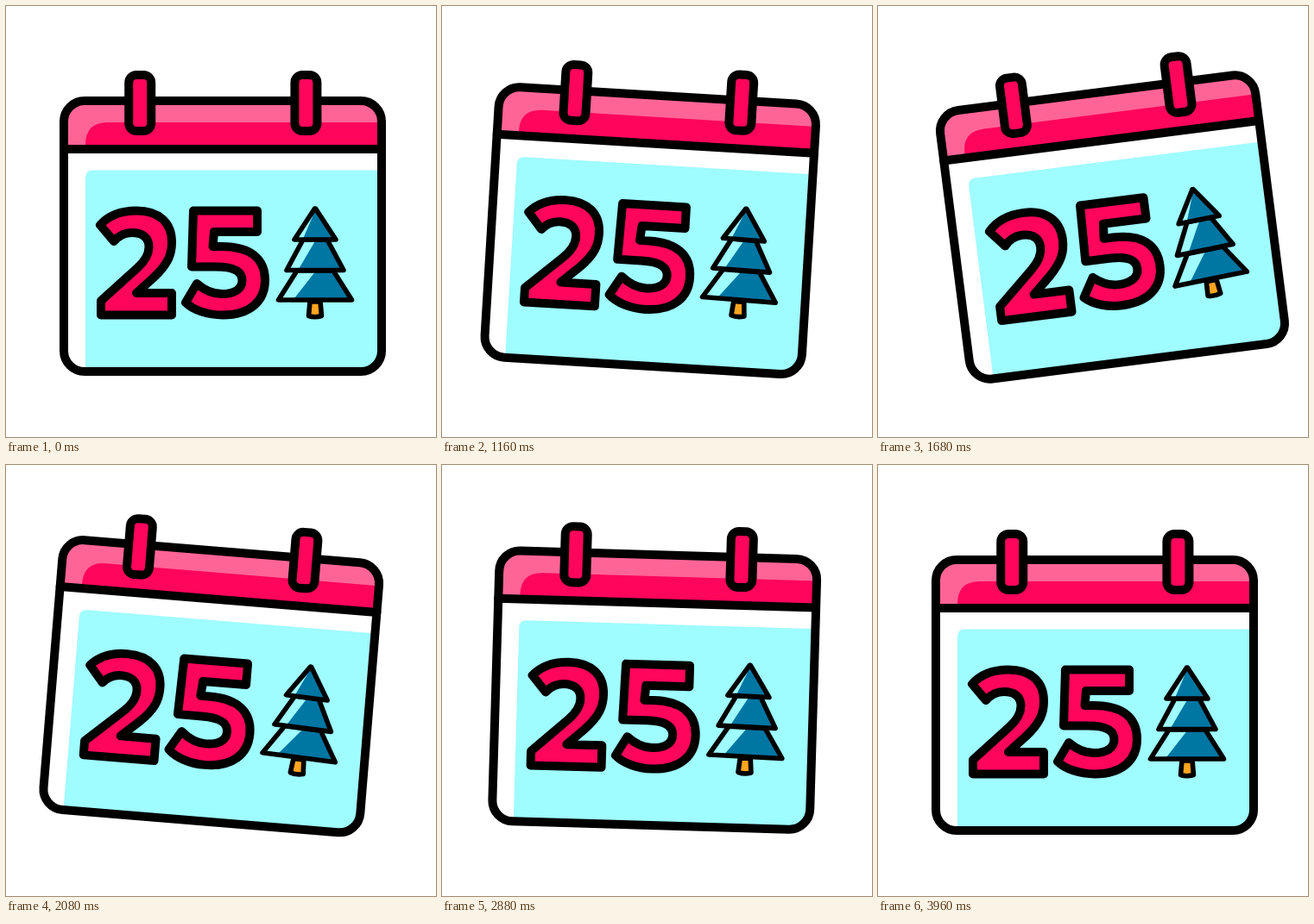
Write an HTML page that moves like this. It is 498 px wide and 500 px high and loops after 4000 ms.

```html
<!DOCTYPE html>
<html lang="en">
<head>
<meta charset="utf-8">
<title>Swinging calendar</title>
<style>
  html, body { margin: 0; width: 100%; height: 100%; overflow: hidden; background: #fff; }
  svg { display: block; width: 100vw; height: 100vh; }
  .ink { stroke: #000; stroke-width: 10; stroke-linejoin: round; stroke-linecap: round; }
  .thin { stroke-width: 5.6; }
  .red { fill: #ff055c; }
  .ice { fill: #9ffcff; }
  .teal { fill: #0076a3; }
  .none { fill: none; }
</style>
</head>
<body>
<svg viewBox="0 0 498 500">
  <defs>
    <clipPath id="page"><rect x="67" y="110" width="368" height="314" rx="24"/></clipPath>
  </defs>
  <g id="calendar">
    <g clip-path="url(#page)">
      <path fill="#fff" d="M67 110H435V424H67Z"/>
      <path fill="#ff6497" d="M67 110H435V166H67Z"/>
      <path class="red" d="M92 166V161Q92 135 118 135H435V166Z"/>
      <path class="ice" d="M92 424V199Q92 190.500 101 190.500H430V424Z"/>
    </g>
    <rect class="ink none" x="67" y="110" width="368" height="314" rx="24"/>
    <path class="ink none" d="M67 166H435"/>
    <rect class="ink red" x="142.2" y="80" width="26" height="65" rx="9"/>
    <rect class="ink red" x="334.4" y="80" width="26" height="65" rx="9"/>

    <path class="ink red" d="M109 254C119 243 132 237.500 151 237.500C177 237.500 192 251 192 274C192 288 188 299 171 315L151 333H192V358.500H110V342L152 304C162 295 165.500 288 165.500 279.500C165.500 269 158.500 263 146 263C137 263 131 266 125 273Z"/>
    <path class="ink red" d="M291 237.500V262H241L239.500 279H250C284 279 300 294 300 318C300 342 283 358.500 251 358.500C234 358.500 217 353 208 344L221 322C229 329 239 334 250 334C265 334 273.500 328 273.500 318.500C273.500 308 265 302.500 243 302.500H215L217 237.500Z"/>

    <g id="tree">
      <path class="ink thin" fill="#ffa51f" d="M352 343L350.500 359.500Q357.500 362 365.500 359.500L364 343Z"/>
      <g id="tiers"></g>
    </g>
  </g>
</svg>
<script>
const LOOP = 4000, STEP = 40, LIFT = 9.8, TREE_LAG = 40;
const calendar = document.getElementById('calendar');
const tree = document.getElementById('tree');

// Tiers from the bottom up: top y, base y, half widths at top and base
const tiers = [[307, 341, 21, 42.5], [271, 306.5, 14, 33], [235, 271, 0.5, 24]];
document.getElementById('tiers').innerHTML = tiers.map(([top, base, a, b]) => {
  const cx = 358;
  const shape = `M${cx - a} ${top}L${cx - b} ${base}H${cx + b}L${cx + a} ${top}Z`;
  const shine = `M${cx - a} ${top}L${cx - b} ${base}H${cx - b * 0.6}L${cx + 1} ${top}Z`;
  return `<path class="teal" d="${shape}"/><path class="ice" d="${shine}"/>
          <path class="ink thin none" d="${shape}"/>`;
}).join('');

// Swing extremes: time in ms, angle in degrees
const swing = [[0, 0], [670, 0], [960, -3.1], [1360, 10], [1720, -7.8],
               [2120, 5], [2480, -3.1], [2860, 1.7], [3220, 0], [LOOP, 0]];

function angleAt(t) {
  const i = Math.max(1, swing.findIndex(([end]) => t <= end));
  const [t0, a0] = swing[i - 1], [t1, a1] = swing[i];
  const p = (t - t0) / (t1 - t0);
  return a0 + (a1 - a0) * (1 - Math.cos(Math.PI * p)) / 2;
}

function draw(t) {
  const y = -LIFT * (1 - Math.cos(2 * Math.PI * t / LOOP)) / 2;
  const sway = 0.75 * angleAt(Math.max(0, t - TREE_LAG));
  calendar.setAttribute('transform', `translate(0 ${y}) rotate(${angleAt(t)} 251 105)`);
  tree.setAttribute('transform', `rotate(${sway} 358 358)`);
}

const start = performance.now();
function tick() {
  const t = (performance.now() - start) % LOOP;
  draw(Math.floor(t / STEP) * STEP);
  requestAnimationFrame(tick);
}
tick();
</script>
</body>
</html>
```
